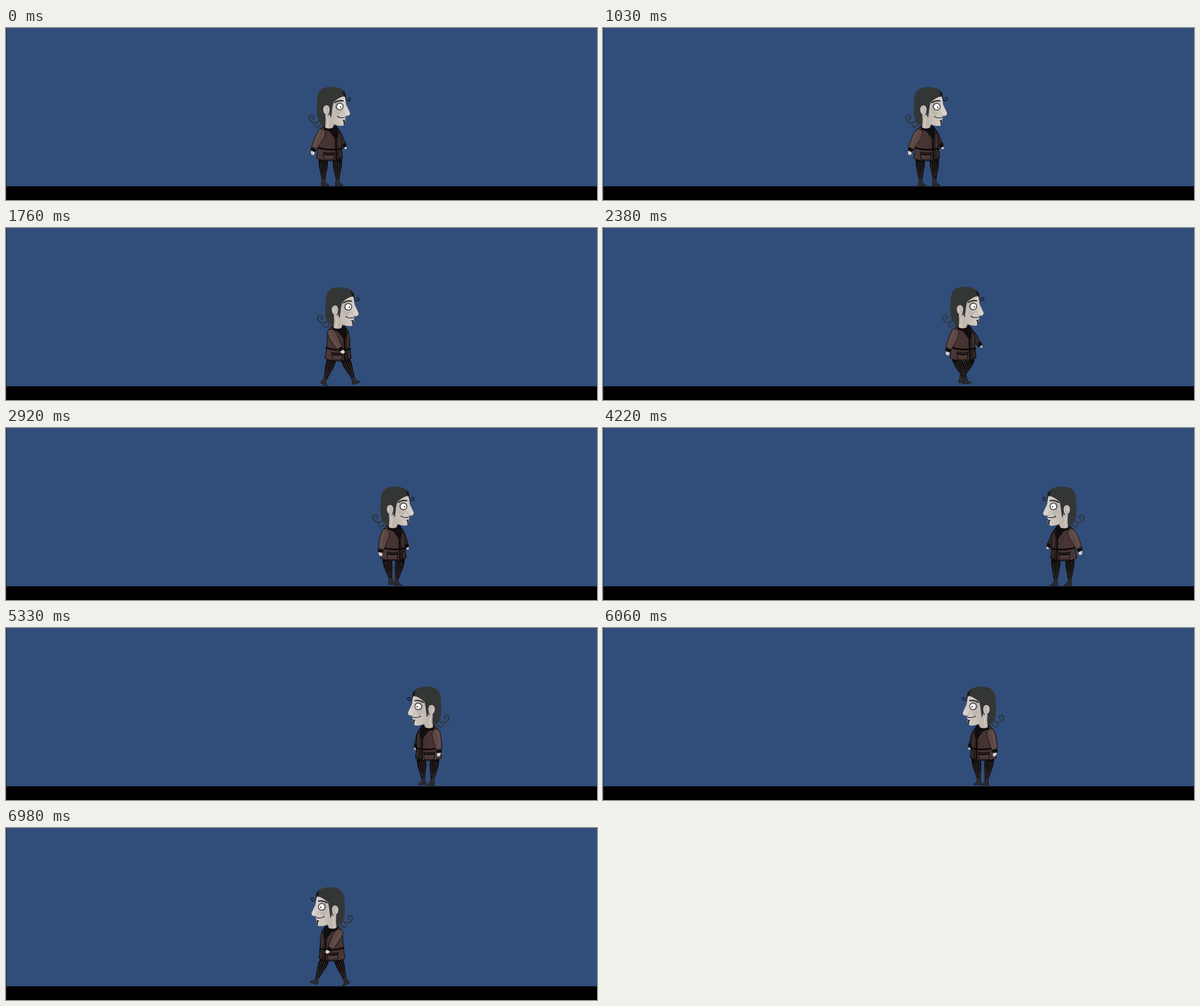
Recreate the animation shown at these times as an HTML page. Size 1008 by 295 pixels, loop 7.04 s.

```html
<!DOCTYPE html>
<html lang="en">
<head>
<meta charset="utf-8">
<title>Evening stroll</title>
<style>
  html, body { margin: 0; width: 100%; height: 100%; overflow: hidden; background: #314d79; }
  svg { display: block; width: 1008px; height: 295px; }
  .line { fill: none; stroke-linecap: round; stroke-linejoin: round; }
</style>
</head>
<body>
<svg viewBox="0 0 1008 295">
  <defs>
    <linearGradient id="skin">
      <stop offset="0" stop-color="#bdb5ac"/>
      <stop offset=".55" stop-color="#cdc6be"/>
      <stop offset="1" stop-color="#ddd7d0"/>
    </linearGradient>
    <linearGradient id="cloth">
      <stop offset="0" stop-color="#4b3836"/>
      <stop offset=".6" stop-color="#453331"/>
      <stop offset="1" stop-color="#352827"/>
    </linearGradient>
    <g id="leg">
      <path d="M-7.500 -3H7.500Q9 9 6 20L3.500 34H-2.500L-5.500 20Q-8.500 9-7.500-3Z" fill="#0c0a0b"/>
      <g class="line" stroke="#4c3e3a" stroke-width=".7">
        <path d="M-5 4Q-5 17-1.500 31M-2 3Q-2 17 0 32M1.500 4Q2 17 1.500 31M5 5Q5 17 2.800 28"/>
      </g>
    </g>
    <path id="boot" d="M-2.600 32.500H3.400L3.800 39Q6 42 10 43.500L9.500 45H-3.500Q-4 41-2.600 38Z"
          fill="#2b2a2d" stroke="#17161a" stroke-width=".6"/>
  </defs>

  <rect width="1008" height="295" fill="#314d79"/>
  <rect y="271.5" width="1008" height="24" fill="#000"/>
  <rect width="1" height="295" fill="#2b2b2b"/>

  <g id="man">
    <g id="farLeg"><use href="#leg"/><g id="farBoot"><use href="#boot"/></g></g>
    <g id="nearLeg"><use href="#leg"/><g id="nearBoot"><use href="#boot"/></g></g>

    <g id="upper">
      <g id="farArm">
        <path d="M576 203L580 203Q582 205 580.500 208L577 207Z" fill="#d0c8c0"/>
        <path d="M563 176Q569 175 573 183L580.500 202L575 206L564 190Z" fill="#382a29" stroke="#0b090a"/>
        <path d="M573.500 199L579.500 197L581 203L575.500 206Z" fill="#100d0e"/>
      </g>

      <!-- coat -->
      <path d="M539 170Q549 166 563 169L569 176Q573 190 572 205L574 223Q565 228 551 228Q539 228 529.500 223Q532 211 532.500 203L534 184Q534 174 539 170Z"
            fill="url(#cloth)" stroke="#0d0a0b"/>
      <path d="M541 167Q552 174 563 166L569.500 178L566 185L567.500 227H562L561 190L552 178L543 175Z" fill="#110e10"/>
      <path d="M545 175Q556 181 561 194M566 175L569.500 186L568.500 204M565 190L565.500 225" class="line" stroke="#4d3b39" stroke-width=".9"/>
      <path d="M532 205Q549 211 572.500 207" class="line" stroke="#0c0a0b" stroke-width="3"/>
      <path d="M568.500 212H573V222L568.500 224Z" fill="#3a2c2b" stroke="#0d0a0b" stroke-width=".7"/>
      <path d="M541 213Q550 215 560 213.500L559 226H542.500Z" fill="#4a3735" stroke="#0d0a0b"/>
      <path d="M541 214Q550 216 560 214.500V218.500Q550 220 541 218Z" fill="#1a1415"/>
      <path d="M543 219Q550 221 558 219" class="line" stroke="#75605a" stroke-width=".6"/>

      <g id="nearArm">
        <path d="M520.500 210L526 212Q527 216 524.500 218Q521 218 520 215Z" fill="#d6cfc7"/>
        <path d="M534 174Q541 171 544 177Q546 183 541 191L528 211L520 208Q525 187 534 174Z" fill="#5d4744" stroke="#130f10" stroke-width=".9"/>
        <path d="M522 204L530 208L527 213L519.500 210Z" fill="#131011"/>
        <path d="M536 178Q530 188 527 201" class="line" stroke="#715a56" stroke-width="1.300"/>
      </g>

      <g id="head">
        <!-- back hair and curls -->
        <g id="curls" class="line" stroke="#303332">
          <path d="M535 156Q531 165 523.500 162Q515 158 517.500 151.500Q522 148 525 152Q526 155.500 522 156" stroke-width="1.800"/>
          <path d="M538 159Q537 169 531 170Q526.500 170 527.500 166" stroke-width="1.700"/>
          <path d="M541 160L540 169" stroke-width="1.800"/>
        </g>
        <path d="M532 146L548 146L547 164L542 168L537 163L532.500 160Z" fill="#333635"/>
        <!-- neck -->
        <path d="M546 146L561 158L557.500 171Q550 174 544 170.500Q546 159 544.500 150Z" fill="#bfb7ae"/>
        <path d="M549 154Q550 164 548 170" class="line" stroke="#d3ccc4" stroke-width="2"/>
        <!-- face -->
        <path d="M553 120L571 112L579 117Q578.500 124 580 131L586.500 145Q587.500 149 583.500 150.500L578.500 151L580 154.500L578 156.500L579 159Q579 165 575 167.500Q566 169 558 164L551 154Z"
              fill="url(#skin)"/>
        <path d="M580 131L586.500 145Q587.500 149 583.500 150.500L579 151" class="line" stroke="#9b928b" stroke-width=".6"/>
        <path d="M561 142Q567 147 574 143M562 146Q567 149 571 147M576 144Q575 149 579 150" class="line" stroke="#a39a92" stroke-width=".8"/>
        <path d="M574 158Q577 157 578.500 159L578 165L575.500 166Q577 162 574 158Z" fill="#29282a"/>
        <path d="M565.500 151.500Q569 155 578.500 153.500" class="line" stroke="#242123" stroke-width="1.200"/>
        <path d="M564.500 152.500L566.500 150.500" class="line" stroke="#242123" stroke-width=".8"/>
        <!-- eye -->
        <ellipse cx="568.800" cy="134.700" rx="7.300" ry="7.200" fill="#8e8680"/>
        <circle cx="569.400" cy="134.800" r="5.500" fill="#fff" stroke="#343033" stroke-width="1.100"/>
        <circle cx="571" cy="135.600" r="1.100" fill="#09080a"/>
        <path d="M560.500 128Q567 123.500 575 125" class="line" stroke="#1e1c1e" stroke-width="2"/>
        <!-- hair -->
        <path d="M530.500 152Q529.500 122 532.500 113Q537 101 554 101Q571 101 578.500 110L579.500 118Q572 115 559 127Q557 132 556 143L554.500 154Q552 150 551 142L541 146L540 162Q534 158 530.500 152Z"
              fill="#333635"/>
        <path d="M573 108Q580 110 579.500 118L575.500 115Z" fill="#171819"/>
        <path d="M578 112Q578 122 583 125Q588 125 587.300 120.500Q584.500 118 583.300 121" class="line" stroke="#1b1c1d" stroke-width="1.500"/>
        <!-- ear -->
        <path d="M546 132.500Q551 132 552 139Q551.500 148 547 149Q541 147 541 139Q541.500 133.500 546 132.500Z" fill="#c8c0b7"/>
        <path d="M545 136Q549 136 549 140Q548 144 546 146" class="line" stroke="#a1988f" stroke-width="1"/>
      </g>
    </g>
  </g>
</svg>

<script>
const LOOP = 7040, TURN = 4130, MIRROR = 1337.5;

// [time, distance walked, stride cycles]
const right = [[1540, 0, -.24], [1760, 14.5, 0], [2500, 71.5, .8], [2920, 108.5, 1.25],
               [3260, 142.5, 1.62], [3980, 219, 2.4], [4130, 234, 2.55]];
const left = [[4480, 0, -.3], [4720, 20, 0], [5330, 65, .77], [5450, 77.5, .93],
              [6060, 137, 1.76], [6180, 147.5, 1.92], [6980, 229.5, 3], [7040, 235, 3.08]];
// [time, walk amount]
const gait = [[1540, 0], [1740, 1], [3980, 1], [4130, 0], [4480, 0], [4680, 1]];

const parts = {};
document.querySelectorAll('g[id]').forEach(g => parts[g.id] = g);
const move = (name, value) => parts[name].setAttribute('transform', value);

function sample(rows, t, col) {
  if (t <= rows[0][0]) return rows[0][col];
  for (let i = 1; i < rows.length; i++) {
    const a = rows[i - 1], b = rows[i];
    if (t <= b[0]) return a[col] + (b[col] - a[col]) * (t - a[0]) / (b[0] - a[0]);
  }
  return rows[rows.length - 1][col];
}

// Positive angles swing a limb forward.
function poseLeg(side, x, angle, lift, flex) {
  move(side + 'Leg', `translate(${x} 225.5) rotate(${-angle}) scale(1 ${1 - lift})`);
  move(side + 'Boot', `rotate(${flex} 0 35)`);
}

function draw(t) {
  const facingLeft = t >= TURN;
  const path = facingLeft ? left : right;
  const dist = sample(path, t, 1);
  const turn = sample(path, t, 2) * 2 * Math.PI;
  const w = sample(gait, t, 1);
  const c = Math.cos(turn), s = Math.sin(turn);

  move('man', facingLeft ? `translate(${MIRROR - dist} 0) scale(-1 1)` : `translate(${dist} 0)`);

  // Boots counter part of the leg swing so the soles stay near the ground.
  const near = w * (10 - 29 * c), far = w * (-11 + 33 * c);
  poseLeg('near', 541, near, w * .03 * Math.max(0, s), near > 0 ? near * .7 : -near * .5);
  poseLeg('far', 565 - w, far, w * .03 * Math.max(0, -s), far > 0 ? far * .2 : far * .7);

  const swing = c > 0 ? 44 * c : 16 * c;
  move('nearArm', `rotate(${-w * (11 + swing)} 539 178)`);
  move('farArm', `rotate(${w * (6 + 30 * c)} 567 179)`);

  const breath = (1 - w) * .004 * Math.sin(Math.max(0, t - 300) / 1240 * 2 * Math.PI);
  const bob = w * .4 * Math.cos(2 * turn);
  move('upper', `translate(0 ${228 + bob}) scale(1 ${1 + breath}) translate(0 -228)`);
  move('curls', `rotate(${w * s} 537 158)`);
}

const start = performance.now();
function tick() {
  draw((performance.now() - start) % LOOP);
  requestAnimationFrame(tick);
}
tick();
</script>
</body>
</html>
```
